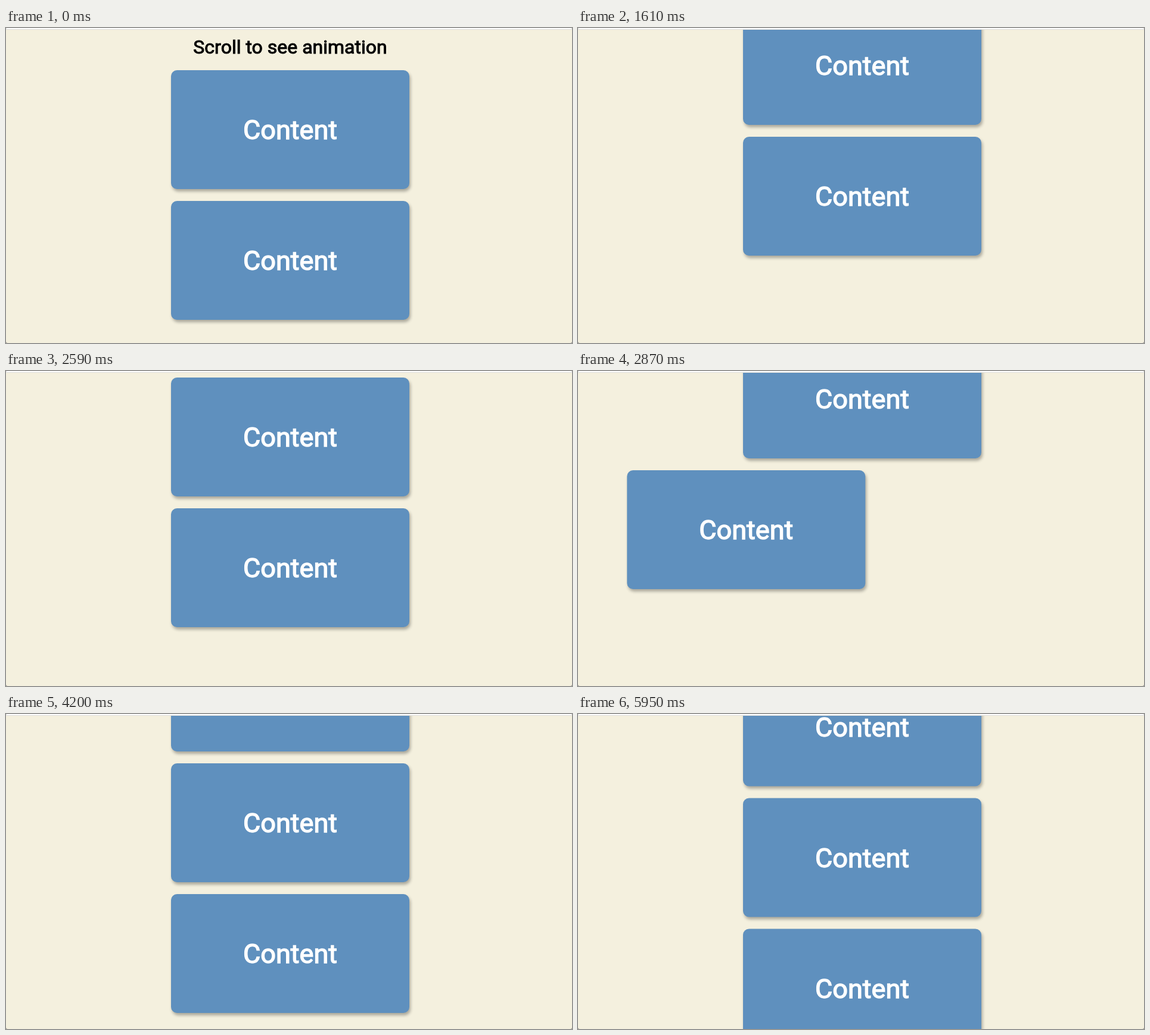
An HTML page that plays this animation: 950 by 530 pixels, repeating every 6230 ms.

```html
<!DOCTYPE html>
<html lang="en">
<head>
<meta charset="utf-8">
<title>Scroll Animation</title>
<style>
  html, body { margin: 0; width: 100%; height: 100%; overflow: hidden; background: #8b8b86; }
  .window {
    position: absolute; left: 0; top: 0; width: 950px; height: 530px;
    overflow: hidden; border-radius: 2px 2px 3px 3px; background: #f4f0de;
    font-family: Roboto, sans-serif;
  }
  .bar {
    position: absolute; left: 0; top: 0; width: 100%; height: 2px;
    background: #fff; border-bottom: 1px solid #dcdcd8;
  }
  .view { position: absolute; left: 0; top: 3px; width: 950px; height: 527px; overflow: hidden; }
  .page {
    position: absolute; left: 2px; top: 0; width: 950px;
    display: flex; flex-direction: column; align-items: center;
  }
  h1, h2 { font-weight: 400; line-height: normal; white-space: nowrap; }
  h1 { margin: 10px; font-size: 32px; color: #000; -webkit-text-stroke: 1px #000; }
  h2 { margin: 0; font-size: 45px; -webkit-text-stroke: 1.4px #fff; }
  .box {
    flex: none; width: 400px; height: 200px; margin: 10px;
    display: flex; align-items: center; justify-content: center;
    border-radius: 10px; background: #5f90be; color: #fff;
    box-shadow: 2px 4px 5px rgba(0, 0, 0, .3);
  }
</style>
</head>
<body>
<div class="window">
  <div class="view">
    <div class="page">
      <h1>Scroll to see animation</h1>
      <div class="box"><h2>Content</h2></div>
      <div class="box"><h2>Content</h2></div>
      <div class="box"><h2>Content</h2></div>
      <div class="box"><h2>Content</h2></div>
      <div class="box"><h2>Content</h2></div>
      <div class="box"><h2>Content</h2></div>
    </div>
  </div>
  <div class="bar"></div>
</div>
<script>
const LOOP = 6230, TICK = 70, LEAD = 10;
const SLIDE = 400, DISTANCE = 1600;

// Scroll strokes: [time in ms, scroll offset in px]
const keys = [
  [560, 0], [800, 12], [1120, 22], [1330, 26],
  [1535, 89], [1750, 135], [1950, 148], [2030, 150],
  [2240, 165], [2420, 200], [2634, 309], [2840, 529], [2870, 564],
  [2940, 606], [3080, 632], [3290, 636], [3400, 636],
  [3780, 646], [4130, 646], [4200, 648],
  [4360, 749], [4500, 795], [4700, 809], [4760, 809.5]
];
// When each box reaches the trigger line; the first two start in place
const enter = [-SLIDE, -SLIDE, 1535, 2634, 2840, 4360];

const slopes = keys.slice(1).map(([t, y], i) => (y - keys[i][1]) / (t - keys[i][0]));
const tangents = keys.map((_, i) => {
  const a = slopes[i - 1], b = slopes[i];
  return a > 0 && b > 0 ? 2 * a * b / (a + b) : 0;
});

// Monotone cubic through the scroll keys
function scrollAt(t) {
  const last = keys.length - 1;
  if (t <= keys[0][0]) return keys[0][1];
  if (t >= keys[last][0]) return keys[last][1];
  const i = keys.findIndex(k => k[0] > t) - 1;
  const [t0, y0] = keys[i], [t1, y1] = keys[i + 1];
  const d = t1 - t0, u = (t - t0) / d, v = 1 - u;
  return y0 * v * v * (1 + 2 * u) + y1 * u * u * (3 - 2 * u)
    + d * u * v * (tangents[i] * v - tangents[i + 1] * u);
}

// CSS "ease": cubic-bezier(.25, .1, .25, 1)
function ease(x) {
  if (x <= 0) return 0;
  if (x >= 1) return 1;
  let lo = 0, hi = 1;
  for (let n = 0; n < 30; n++) {
    const u = (lo + hi) / 2;
    if (.75 * u * (1 - u) + u ** 3 < x) lo = u; else hi = u;
  }
  const v = 1 - lo;
  return .3 * v * v * lo + 3 * v * lo * lo + lo ** 3;
}

const page = document.querySelector('.page');
const boxes = [...document.querySelectorAll('.box')];

function draw(t) {
  const y = Math.round(scrollAt(t) * 2) / 2;
  page.style.transform = `translateY(${-y}px)`;
  boxes.forEach((box, i) => {
    const side = i % 2 ? -1 : 1;
    const x = side * DISTANCE * (1 - ease((t - enter[i]) / SLIDE));
    box.style.transform = `translateX(${x.toFixed(1)}px)`;
  });
}

const start = performance.now();
function frame() {
  const t = (performance.now() - start + LEAD) % LOOP;
  draw(Math.floor(t / TICK) * TICK);
  requestAnimationFrame(frame);
}
frame();
</script>
</body>
</html>
```
